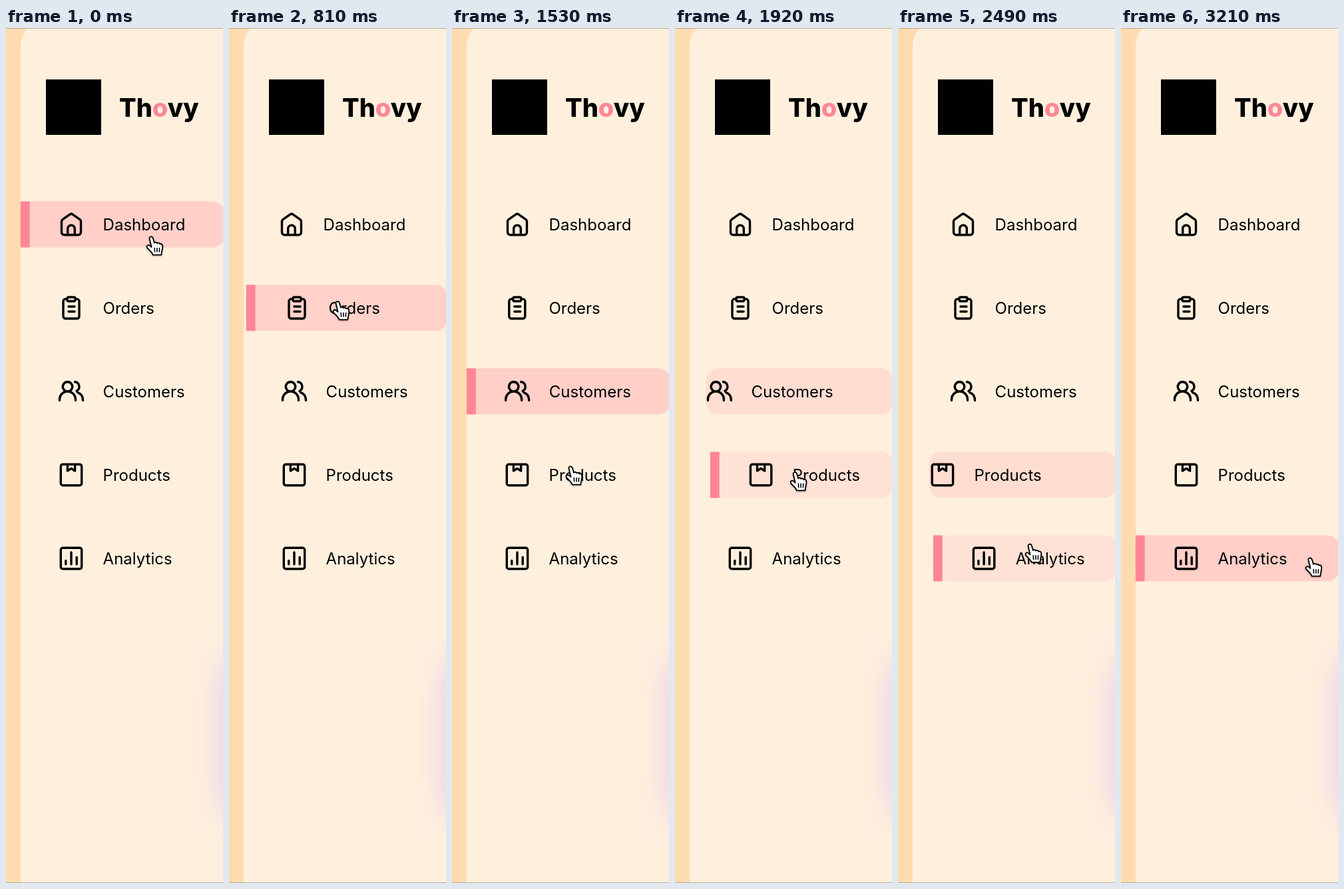
Animation of 326 by 1280 pixels, one loop 3.24 s. Source, as an HTML page:

```html
<!DOCTYPE html>
<html lang="en">
<head>
<meta charset="utf-8">
<style>
  html, body { margin: 0; width: 100%; height: 100%; overflow: hidden; background: #ffdcb0; }
  #stage { position: relative; width: 326px; height: 1280px; overflow: hidden; }
  #panel { position: absolute; left: 22px; top: -10px; width: 400px; height: 1400px;
           border-radius: 36px 0 0 0; background: #fff0de; }
  #glow { position: absolute; left: 327px; top: 943px; width: 200px; height: 238px;
          border-radius: 30px; box-shadow: 0 0 50px rgba(205, 175, 250, .6); }
  svg { position: absolute; left: 0; top: 0; }
  text { font: 24px Inter, sans-serif; font-optical-sizing: none; }
  .brand { font-size: 38px; font-weight: 800; }
  .icon { fill: none; stroke: #000; stroke-width: 3.4; stroke-linecap: round; stroke-linejoin: round; }
  #hand { filter: drop-shadow(0 1.5px 1px rgba(0, 0, 0, .35)); }
</style>
</head>
<body>
<div id="stage">
  <div id="panel"></div>
  <div id="glow"></div>
  <svg width="326" height="1280" viewBox="0 0 326 1280">
    <rect x="60" y="77" width="83" height="83"/>
    <text class="brand" x="170" y="133">Th<tspan fill="#ff8797">o</tspan>vy</text>
    <g id="menu"></g>
    <g id="hand" stroke="#000" stroke-linecap="round" stroke-linejoin="round">
      <path fill="#fff" stroke-width="1.8" d="M5.6 4.5C5 .8 9.8 .2 10.8 3.6L13 10.8C14 9.2 16.6 9.6 17 11.2
        C18.2 10 20.4 10.6 21 12.4C22.6 11.4 25 12.4 25.2 15C25.6 20.5 23.6 23 23.4 28.6H10.6
        C10 25.6 6.4 22.6 2.6 18.6C.2 15.8 2.6 13 5.6 14.6L8.6 17Z"/>
      <path fill="none" stroke-width="1.6" d="M13.2 18.5l.4 5.5M16.9 18.5v5.5M20.6 18.5l-.3 5.5"/>
    </g>
    <path d="M0 .5H326M0 1279.5H326" stroke="#b8aa98"/>
  </svg>
</div>
<script>
const LOOP = 3240, STEP = 30, SLIDE = 300, INDENT = 56;
const EDGE = 21.8, RIGHT = 328;
const SQUARE = 'M-12.7-15.7H12.7a3 3 0 0 1 3 3V12.7a3 3 0 0 1-3 3H-12.7a3 3 0 0 1-3-3V-12.7a3 3 0 0 1 3-3Z';

// Each entry: label, icon path around its centre, time of selection
const items = [
  ['Dashboard', 'M-14.5-4.2V11.7a4 4 0 0 0 4 4H10.5a4 4 0 0 0 4-4V-4.2a4 4 0 0 0-1.6-3.2L2.2-14.9a3.5 3.5 0 0 0-4.4 0L-12.9-7.4a4 4 0 0 0-1.6 3.2Z'
    + 'M-5.3 15.5V6.5a5.3 5.3 0 0 1 10.6 0V15.5', -1000],
  ['Orders', 'M-6-13.4H-8.5a3.5 3.5 0 0 0-3.5 3.5V12.5a3.5 3.5 0 0 0 3.5 3.5H8.5a3.5 3.5 0 0 0 3.5-3.5V-9.9a3.5 3.5 0 0 0-3.5-3.5H6'
    + 'M-4-16H4a2 2 0 0 1 2 2V-12a2 2 0 0 1-2 2H-4a2 2 0 0 1-2-2V-14a2 2 0 0 1 2-2ZM-4-2H5M-4 5.5H5', 608],
  ['Customers', 'M-5.5-14.3a7.2 7.2 0 1 0 .01 0ZM-17.5 13.5V12a12 12 0 0 1 24 0V13.5'
    + 'M5.5-14.2a7.2 7.2 0 0 1 2.5 13.6M9.5 1.6c5 1.6 8 6 8 11.9', 1254],
  ['Products', SQUARE + 'M-5.6-15.5V-6L0-9.6L5.6-6V-15.5', 1840],
  ['Analytics', SQUARE + 'M-8.2 3.5V8.8M0-9V8.8M8.2-1.8V8.8', 2410]
].map(([label, icon, start]) => ({ label, icon, start }));

// Pointer stops: time, x, y
const stops = [
  [0, 210, 311], [510, 156, 407], [840, 155, 408], [1080, 167, 540], [1320, 168, 540],
  [1530, 170, 655], [1880, 171, 657], [2150, 190, 770], [2700, 190, 772], [3210, 276, 792], [LOOP, 276, 792]
];

const clamp = v => Math.min(1, Math.max(0, v));
const bezier = (a, b, u) => 3 * a * u * (1 - u) ** 2 + 3 * b * u * u * (1 - u) + u ** 3;

// CSS "ease" timing curve
function ease(x) {
  x = clamp(x);
  let low = 0, high = 1;
  for (let i = 0; i < 20; i++) {
    const mid = (low + high) / 2;
    if (bezier(.25, .25, mid) < x) low = mid; else high = mid;
  }
  return bezier(.1, 1, low);
}

const menu = document.getElementById('menu');
const hand = document.getElementById('hand');

items.forEach((item, i) => {
  const y = 294 + 125 * i;
  menu.insertAdjacentHTML('beforeend', `<g>
    <rect y="${y - 34.5}" height="69" rx="18" fill="#ffcfc8"/>
    <rect y="${y - 34.5}" width="13.8" height="69" fill="#ff8595"/>
    <g><path class="icon" d="${item.icon}" transform="translate(98 ${y})"/>
    <text x="145.6" y="${y + 8.5}">${item.label}</text></g></g>`);
  [item.back, item.bar, item.content] = menu.lastElementChild.children;
  item.end = items[i + 1]?.start ?? Infinity;
});

function drawItem({ start, end, back, bar, content }, t) {
  const active = t >= start && t < end;
  const on = active ? ease((t - start) / SLIDE) : t < start ? 0 : 1 - ease((t - end) / SLIDE);
  const left = EDGE + INDENT * (1 - on);
  back.setAttribute('x', left);
  back.setAttribute('width', RIGHT - left);
  back.setAttribute('opacity', on);
  bar.setAttribute('x', left);
  bar.setAttribute('visibility', active ? 'visible' : 'hidden');
  // The bar and its gap push the content right by the full indent
  content.setAttribute('transform', `translate(${left - EDGE - (active ? 0 : INDENT)} 0)`);
}

function drawHand(t) {
  const k = stops.findIndex(stop => stop[0] > t);
  const [t0, x0, y0] = stops[k - 1], [t1, x1, y1] = stops[k];
  const u = (t - t0) / (t1 - t0), s = u * u * (3 - 2 * u);
  hand.setAttribute('transform', `translate(${x0 + (x1 - x0) * s} ${y0 + (y1 - y0) * s})`);
}

function draw(now) {
  const t = Math.floor((now % LOOP) / STEP) * STEP;
  items.forEach(item => drawItem(item, t));
  drawHand(t);
}

const origin = performance.now();
function tick() {
  draw(performance.now() - origin);
  requestAnimationFrame(tick);
}
tick();
</script>
</body>
</html>
```
